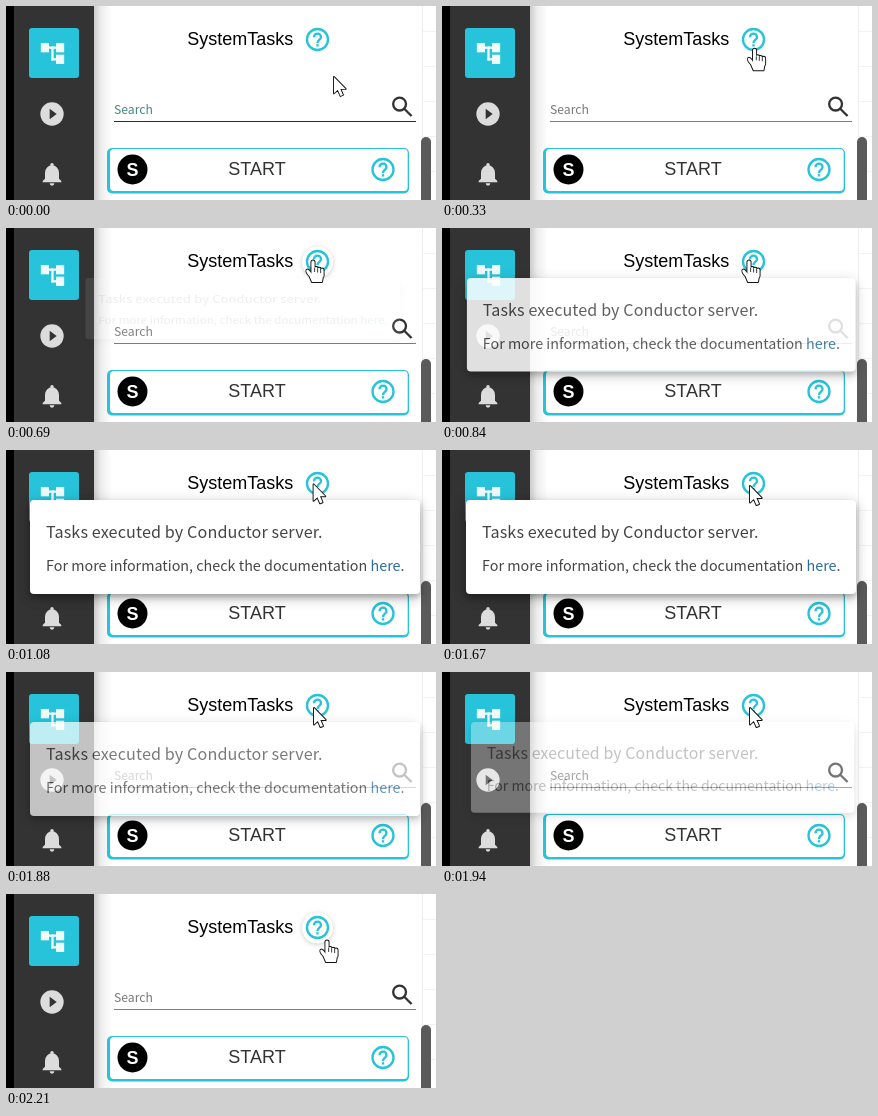
Animation, 430 px wide and 194 px high, one loop 2270 ms. Source, as an HTML page with a canvas:

```html
<!DOCTYPE html>
<html lang="en">
<head>
<meta charset="utf-8">
<title>System tasks tooltip</title>
<style>
html, body { margin: 0; width: 430px; height: 194px; overflow: hidden; background: #fff; }
canvas { position: absolute; left: 0; top: 0; }
#tip {
  position: absolute; left: 24px; top: 50px; width: 390px; height: 94px;
  background: #fff; border-radius: 4px; opacity: 0;
  transform-origin: 288px 0;
  box-shadow: 0 3px 5px rgba(0,0,0,.2), 0 5px 12px rgba(0,0,0,.16), 0 2px 16px rgba(0,0,0,.13);
}
#tip svg { display: block; }
#tip text { font-family: "Noto Sans CJK JP", "Noto Sans CJK SC", "Noto Sans", sans-serif; fill: #444; }
#tip .head { font-size: 16.15px; letter-spacing: .0075em; }
#tip .body { font-size: 14.35px; }
</style>
</head>
<body>
<canvas id="page" width="430" height="194"></canvas>
<div id="tip">
  <svg width="390" height="94">
    <text class="head" x="16" y="38">Tasks executed by Conductor server.</text>
    <text class="body" x="16" y="71">For more information, check the documentation <tspan fill="#2b6a99">here</tspan>.</text>
  </svg>
</div>
<canvas id="pointer" width="430" height="194"></canvas>
<script>
const LOOP = 2270, OPEN = 630, CLOSE = 1780, SPAN = 370;
const SANS = '"Liberation Sans", Arial, sans-serif';
const LIGHT = '"Noto Sans CJK JP", "Noto Sans CJK SC", "Noto Sans", sans-serif';
const TEAL = '#26c3da', DARK = '#333', PALE = '#dcdcdc';

const g = document.getElementById('page').getContext('2d');
const p = document.getElementById('pointer').getContext('2d');
const tip = document.getElementById('tip');

const clamp = v => Math.min(1, Math.max(0, v));
const mix = (a, b, k) => a + (b - a) * k;
const ramp = (t, from, to) => clamp((t - from) / (to - from));

// cubic-bezier(.4, 0, .2, 1)
function ease(x) {
  let lo = 0, hi = 1;
  for (let i = 0; i < 20; i++) {
    const s = (lo + hi) / 2, r = 1 - s;
    if (1.2 * r * r * s + 0.6 * r * s * s + s * s * s < x) lo = s; else hi = s;
  }
  return lo * lo * (3 - 2 * lo);
}

function rect(x, y, w, h, color, radius = 0) {
  g.fillStyle = color;
  g.beginPath();
  g.roundRect(x, y, w, h, radius);
  g.fill();
}

function disc(x, y, r, color, end = 7) {
  g.fillStyle = color;
  g.beginPath();
  g.arc(x, y, r, 0, end);
  g.fill();
}

function ring(x, y, r) {
  g.beginPath();
  g.arc(x, y, r, 0, 7);
  g.stroke();
}

function label(text, x, y, size, color, family = SANS) {
  g.font = `${size}px ${family}`;
  g.fillStyle = color;
  g.fillText(text, x, y);
}

// Icons are drawn on a 24 unit grid, shown at 28 px.
const icons = {
  tree(c) {
    for (const [x, y] of [[2, 3], [15, 3], [15, 13]]) rect(x, y, 7, 8, c);
    rect(9, 6, 6, 2, c);
    rect(11, 6, 2, 12, c);
    rect(11, 16, 4, 2, c);
  },
  play(c) {
    disc(12, 12, 10, c);
    g.fillStyle = DARK;
    g.fill(new Path2D('M10 7.5L16 12L10 16.5Z'));
  },
  bell(c) {
    disc(12, 4, 1.5, c);
    disc(12, 20, 2, c, Math.PI);
    g.beginPath();
    g.ellipse(12, 11, 6, 6.5, 0, Math.PI, 0);
    g.lineTo(18, 16);
    g.lineTo(20, 18);
    g.lineTo(20, 19);
    g.lineTo(4, 19);
    g.lineTo(4, 18);
    g.lineTo(6, 16);
    g.fill();
  },
  help(c) {
    ring(12, 12, 9);
    g.beginPath();
    g.arc(12, 10, 3, Math.PI, 0);
    g.bezierCurveTo(15, 12, 12, 12.3, 12, 15);
    g.stroke();
    rect(11, 16, 2, 2, c);
  },
  search() {
    ring(9.5, 9.5, 5.5);
    g.beginPath();
    g.moveTo(13.5, 13.5);
    g.lineTo(19.75, 19.75);
    g.stroke();
  }
};

function icon(name, x, y, color) {
  g.save();
  g.translate(x - 14, y - 14);
  g.scale(7 / 6, 7 / 6);
  g.strokeStyle = color;
  g.lineWidth = 2;
  icons[name](color);
  g.restore();
}

function drawSidebar() {
  rect(0, 0, 88, 194, DARK);
  rect(0, 0, 8, 194, '#000');
  const shade = g.createLinearGradient(88, 0, 106, 0);
  shade.addColorStop(0, 'rgba(0,0,0,.2)');
  shade.addColorStop(0.4, 'rgba(0,0,0,.07)');
  shade.addColorStop(1, 'rgba(0,0,0,0)');
  rect(88, 0, 18, 194, shade);
  rect(23, 22, 50, 50, TEAL, 3);
  icon('tree', 46.5, 47.5, '#eefafc');
  icon('play', 46, 108, PALE);
  icon('bell', 46, 168, PALE);
}

function drawPage(t) {
  rect(0, 0, 430, 194, '#fff');
  rect(416, 0, 1, 194, '#eee');
  for (let y = 25; y < 194; y += 35) rect(417, y, 13, 1, '#f3f3f3');
  drawSidebar();

  label('SystemTasks', 181.3, 39, 18, '#000');
  if ((t >= OPEN && t < 840) || t >= 2120) {
    g.save();
    g.shadowColor = 'rgba(0,0,0,.2)';
    g.shadowBlur = 4;
    g.shadowOffsetY = 1;
    disc(311.5, 34, 15.5, '#fff');
    g.restore();
  }
  icon('help', 311.5, 33.5, TEAL);

  // The field loses its hover colour as the pointer leaves.
  const fade = ramp(t, 60, 260), gray = mix(45, 125, fade);
  label('Search', 108, 108, 12.2, `hsl(174 ${mix(32, 0, fade)}% ${mix(40, 47, fade)}%)`, LIGHT);
  rect(108, 115, 302, 1, `rgb(${gray},${gray},${gray})`);
  icon('search', 396.5, 101, DARK);

  rect(101, 142, 302, 45.5, TEAL, 5);
  rect(104, 143, 297.7, 42, '#fff', 4);
  disc(126.5, 163.5, 15, '#000');
  label('S', 120.5, 170, 'bold 18', '#fff');
  label('START', 222.3, 169, 18, DARK);
  icon('help', 377, 163.5, TEAL);
  rect(415, 131, 10, 70, '#5a5a5a', 5);
}

function placeTip(t) {
  const closing = t >= CLOSE;
  const age = t - (closing ? CLOSE : OPEN);
  const fade = ease(ramp(age, 0, SPAN));
  const grow = closing ? 1 - ease(ramp(age, SPAN / 3, SPAN)) : ease(ramp(age, 0, SPAN * 2 / 3));
  const s = mix(0.75, 1, grow);
  tip.style.opacity = closing ? 1 - fade : fade;
  tip.style.transform = grow > 0.999 ? 'none' : `scale(${s}, ${s * s})`;
}

const arrow = new Path2D('M0 0V16.5L3.8 12.9 6.5 19 9 18 6.4 12H11.7Z');

function makeHand() {
  const h = new Path2D('M-4.5 14L10.5 13L9 22H-1Z');
  h.roundRect(-1.6, 0.4, 3.2, 16, 1.6);
  for (let i = 0; i < 3; i++) h.roundRect(1.6 + 3 * i, 7 + 0.7 * i, 3, 9, 1.5);
  const thumb = new Path2D();
  thumb.ellipse(-4, 13, 1.7, 4, -0.6, 0, 7);
  h.addPath(thumb);
  return h;
}
const hand = makeHand();

function drawPointer(t) {
  const up = ramp(t, 0, 450), rest = ramp(t, 1000, 1140), leave = ramp(t, 2060, 2210);
  const pointing = (t >= 240 && t < 1020) || t >= 2060;
  const shape = pointing ? hand : arrow;
  p.clearRect(0, 0, 430, 194);
  p.save();
  p.translate(328 - 21 * up + rest + 13 * leave, 71 - 39 * up + 4 * rest + 10 * leave);
  p.strokeStyle = '#111';
  p.fillStyle = '#fff';
  p.lineJoin = 'round';
  p.lineWidth = 1.9;
  p.stroke(shape);
  p.fill(shape);
  if (pointing) {
    p.fillStyle = '#111';
    for (let i = 0; i < 3; i++) p.fillRect(1.3 + 3 * i, 8 + 0.5 * i, 0.8, 4);
  }
  p.restore();
}

function frame() {
  const t = performance.now() % LOOP;
  drawPage(t);
  placeTip(t);
  drawPointer(t);
  requestAnimationFrame(frame);
}
frame();
</script>
</body>
</html>
```
